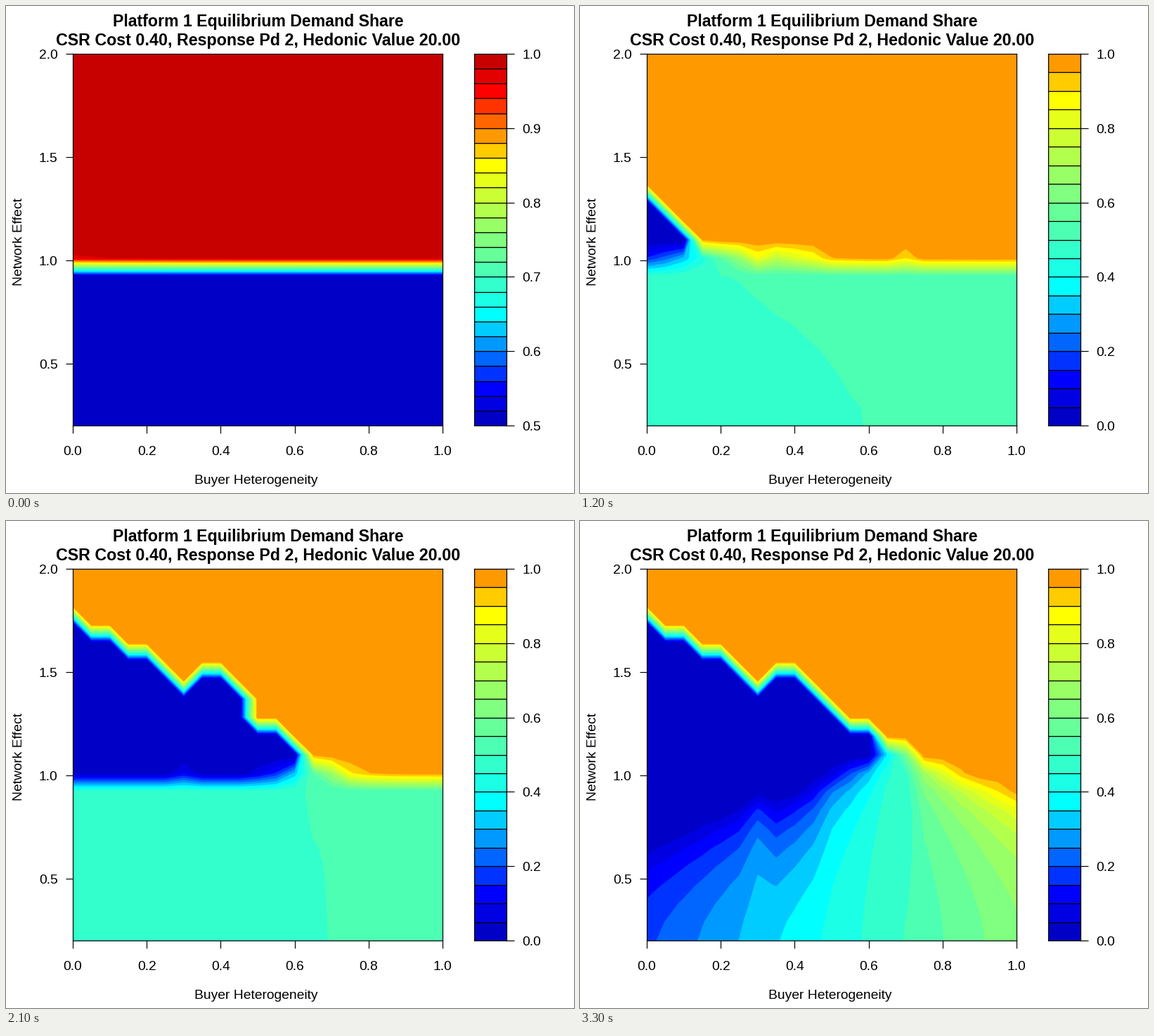
These frames come from a looping animation (808x693 px, 3.6 s). A matplotlib script:

```python
import numpy as np
import matplotlib.pyplot as plt
from matplotlib.animation import FuncAnimation

W, H, DPI = 808, 693, 64
PT = 72 / DPI  # points per pixel
LEFT, RIGHT, TOP, BOTTOM = 95, 621, 68, 597
BAR_L, BAR_R = 666, 712
SIZE = 19.28
LINE = 1.2 * PT

plt.rcParams.update({
    "font.family": "Liberation Sans",
    "axes.linewidth": LINE,
    "xtick.major.width": LINE, "ytick.major.width": LINE,
    "xtick.major.size": 10.5 * PT, "ytick.major.size": 10.5 * PT,
})

# ---- colours: dark blue, cyan, yellow, dark red ---------------------------
k = np.arange(25)
blue = np.clip(np.minimum(0.78 + 0.11 * k, (17 - k) / 10), 0, 1)
green = np.clip(np.minimum(k - 2, 22 - k) / 5, 0, 1)
PALETTE = np.column_stack([blue[::-1], green, blue])

# ---- demand share on a 21 x 21 grid --------------------------------------
X = np.linspace(0, 1, 21)
Y = np.linspace(0.2, 2, 21)
MID, HIGH = 9, 10  # rows for network effect 1.01 and 1.10

# irregularity along buyer heterogeneity, shared by every picture
WOBBLE = np.interp(X, [.25, .3, .35, .4, .45, .5, .65, .7, .75],
                   [0, -1.05, 1.15, 1.15, .9, 0, 0, 1, 0])


def early(t):
    """Even split below the threshold; a shortfall grows from the left."""
    grow = 0.35 ** (3 - t)
    z = np.ones((21, 21))
    z[:MID] = 0.5
    z[MID] = 0.987 - grow * (0.27 * np.exp(-X / 0.22) + 0.015 * WOBBLE)
    return z


def wedge(t):
    """Zero-share wedge under a falling frontier, over a near-even area."""
    start = np.interp(t, [0, 1, 2, 3, 5], [12.5, 16.08, 17.45, 17.56, 17.5])
    slope = np.interp(t, [0, 1, 2, 3, 5], [1, .675, .63, .582, .54])
    base = start - slope * np.arange(21)
    cols = np.flatnonzero(base >= HIGH)
    end = X[cols[-1]]

    z = np.ones((21, 21))

    # near-even area: the 0.5 line bends from its foot to the wedge's end
    foot, head = min(0.69, 0.58 + 0.11 * t), 0.13 + 0.81 * end
    rise = (Y[:MID, None] - 0.2) / 0.72
    split = head + (foot - head) * (1 - rise ** 1.6)
    z[:MID] = 0.5 + np.clip(0.2 * (X - split), -0.01, 0.0025)

    # threshold row: share recovers past the wedge's end
    width = max(0.05, 0.1 - 0.05 * t)
    recover = 1 / (1 + np.exp(0.8 - (X - end) / width))
    z[MID] = np.clip(0.02 + 0.965 * recover - 0.08 * WOBBLE, 0.02, 0.985)

    for j in cols:
        z[HIGH:int(base[j] + WOBBLE[j]) + 1, j] = 0
    z[HIGH, cols[-1] + 1] = 0.97
    return z


def fan(t):
    """Wedge over an area whose shares diverge as the network effect grows."""
    z = wedge(t)
    rise = (Y[:HIGH + 1, None] - 0.2) / 0.93
    gain = np.minimum(1 / (1 - rise ** 1.45), 15)
    low = 0.49 + 0.45 * (X - 0.67) * gain - 0.1 * (1 - 1 / gain) * WOBBLE
    z[:HIGH + 1] = np.clip(low, 0, 1)
    return z


def field(i):
    if i < 4:
        return early(i)
    if i < 10:
        return wedge(i - 4)
    mix = 0.4 if i == 10 else 1
    return (1 - mix) * wedge(5) + mix * fan(5)


FIELDS = [field(i) for i in range(12)]

# ---- layout --------------------------------------------------------------
fig = plt.figure(figsize=(W / DPI, H / DPI), dpi=DPI, facecolor="white")


def pixel_axes(x0, x1):
    return fig.add_axes([x0 / W, 1 - BOTTOM / H, (x1 - x0) / W, (BOTTOM - TOP) / H])


def label(x, y, text, size=SIZE, ha="center", **kw):
    fig.text(x / W, 1 - y / H, text, fontsize=size * PT, ha=ha, va="baseline", **kw)


ax = pixel_axes(LEFT, RIGHT)
bar = pixel_axes(BAR_L, BAR_R)

XTICKS = np.arange(6) / 5
YTICKS = np.arange(1, 5) / 2
ax.set(xlim=(0, 1), ylim=(0.2, 2), xticks=XTICKS, yticks=YTICKS)
ax.tick_params(labelbottom=False, labelleft=False)
for v in XTICKS:
    label(LEFT + v * (RIGHT - LEFT), 639, f"{v:.1f}")
for v in YTICKS:
    label(73.5, BOTTOM - (v - .2) / 1.8 * (BOTTOM - TOP) + 7, f"{v:.1f}", ha="right")

label(358.5, 29, "Platform 1 Equilibrium Demand Share", 23.16, weight="bold")
label(358.5, 56, "CSR Cost 0.40, Response Pd 2, Hedonic Value 20.00", 23.28, weight="bold")
label(355.5, 680, "Buyer Heterogeneity")
label(23.5, 335.5, "Network Effect", rotation=90, rotation_mode="anchor")


def draw_bar(levels):
    lo = levels[0]
    ticks = np.linspace(lo, 1, 6)
    bar.cla()
    bar.barh(levels[:-1], BAR_R - BAR_L, np.diff(levels), align="edge",
             color=PALETTE[:len(levels) - 1], edgecolor="black", linewidth=LINE)
    bar.set(xlim=(0, BAR_R - BAR_L), ylim=(lo, 1), xticks=[], yticks=ticks)
    bar.tick_params(left=False, right=True, labelleft=False)
    drop = 7 * (1 - lo) / (BOTTOM - TOP)
    for v in ticks:
        bar.text(734 - BAR_L, v - drop, f"{v:.1f}", fontsize=SIZE * PT, va="baseline")


def update(i):
    levels = np.linspace(.5, 1, 26) if i < 4 else np.linspace(0, 1, 21)
    for c in list(ax.collections):
        c.remove()
    # stacked fills keep band edges smooth without seams
    ax.set_facecolor(PALETTE[0])
    for lev, color in zip(levels[1:-1], PALETTE[1:]):
        ax.contourf(X, Y, FIELDS[i], levels=[lev, 2], colors=[color], antialiased=True)
    draw_bar(levels)
    return []


anim = FuncAnimation(fig, update, frames=12, init_func=lambda: update(0),
                     interval=300, repeat=True, repeat_delay=0, blit=False)
plt.show()
```
